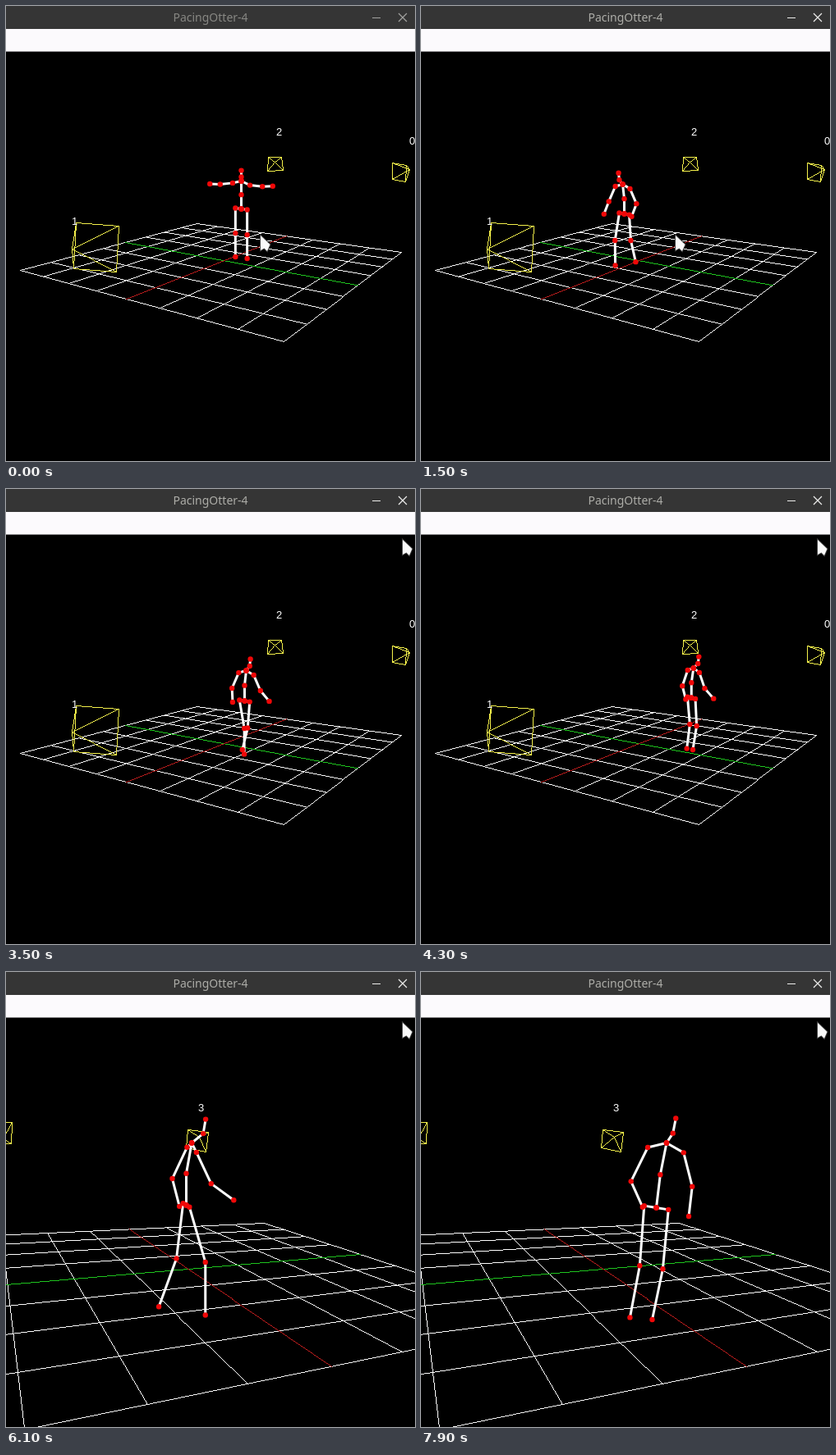
These frames come from a looping animation (498 by 555 pixels, 8000 ms). An HTML page with a canvas:

```html
<!DOCTYPE html>
<html lang="en">
<head>
<meta charset="utf-8">
<title>PacingOtter-4</title>
<style>
html, body { margin: 0; width: 100%; height: 100%; overflow: hidden; background: #000; }
canvas { display: block; }
</style>
</head>
<body>
<canvas id="stage" width="498" height="555"></canvas>
<script>
const W = 498, H = 555, LOOP = 8000, STEP = 100;
const CUT = 4800, FOCUS = 1300;
const ctx = document.getElementById('stage').getContext('2d');
const sin = deg => Math.sin(deg * Math.PI / 180);
const cos = deg => Math.cos(deg * Math.PI / 180);
const clamp = n => Math.min(1, Math.max(0, n));

// ---------- scenery ----------

// Maps the unit square onto a quad in perspective.
function perspective([ax, ay], [bx, by], [cx, cy], [dx, dy]) {
  const x1 = bx - cx, y1 = by - cy, x2 = dx - cx, y2 = dy - cy;
  const sx = ax - bx + cx - dx, sy = ay - by + cy - dy;
  const den = x1 * y2 - x2 * y1;
  const g = (sx * y2 - x2 * sy) / den, h = (x1 * sy - sx * y1) / den;
  return (u, v) => {
    const w = 1 + g * u + h * v;
    return [
      (ax + (bx - ax + g * bx) * u + (dx - ax + h * dx) * v) / w,
      (ay + (by - ay + g * by) * u + (dy - ay + h * dy) * v) / w
    ];
  };
}

// Hard-edged one pixel line.
function thinLine(c, [x0, y0], [x1, y1]) {
  const n = Math.max(1, Math.ceil(Math.max(Math.abs(x1 - x0), Math.abs(y1 - y0))));
  for (let i = 0; i <= n; i++) {
    c.fillRect(Math.round(x0 + (x1 - x0) * i / n), Math.round(y0 + (y1 - y0) * i / n), 1, 1);
  }
}

function drawGrid(c, at) {
  const row = k => thinLine(c, at(0, k), at(8, k));
  const col = k => thinLine(c, at(k, 0), at(k, 8));
  c.fillStyle = '#fff';
  for (let k = 0; k <= 8; k++) {
    if (k === 4) continue;
    row(k);
    col(k);
  }
  c.fillStyle = '#1ec41e';
  row(4);
  c.fillStyle = '#b81c1c';
  col(4);
}

function drawCamera(c, corners, apex, label, x, y) {
  c.fillStyle = '#f4f04a';
  corners.forEach((p, i) => {
    thinLine(c, p, corners[(i + 1) % 4]);
    thinLine(c, p, apex);
  });
  if (!label) return;
  c.fillStyle = '#fff';
  c.font = '13px "Liberation Sans", Arial, sans-serif';
  c.fillText(label, x, y);
}

function makeScene(at, cameras) {
  const layer = document.createElement('canvas');
  layer.width = W;
  layer.height = H;
  const c = layer.getContext('2d');
  c.fillStyle = '#000';
  c.fillRect(0, 0, W, H);
  drawGrid(c, at);
  cameras.forEach(cam => drawCamera(c, ...cam));
  return layer;
}

const farMap = perspective([17, 322], [338, 409], [481, 300], [232, 265]);
const nearMap = perspective([50, 318], [195, 311.4], [482, 463], [172, 527]);

const farScene = makeScene((i, j) => farMap(i / 8, j / 8), [
  [[[85, 264], [137, 268], [134, 324], [82, 320]], [80, 296], '1', 80, 267],
  [[[319, 184], [335, 184], [337, 200], [318, 201]], [327, 190], '2', 329, 158],
  [[[470, 191], [487, 194], [486, 214], [470, 211]], [491, 199], '0', 491, 169]
]);
const nearScene = makeScene((i, j) => nearMap((i - 2) / 3, j / 8), [
  [[[-19, 182], [7, 183], [6, 209], [-20, 207]], [-4, 203]],
  [[[221, 192], [246, 195], [243, 219], [219, 214]], [235, 201], '3', 234, 170]
]);

// ---------- motion ----------

// time, pelvis x, pelvis y, torso length, turn, lean, upper arm spread, forearm spread
const farWalk = [
  [0, 286, 247, 34, 0, 0, 85, 92],
  [850, 277, 252, 35, -20, 0, 24, 0],
  [1500, 247, 253, 36, -37, 0, 24, 0],
  [2000, 231, 258, 36, 0, 0, 16, 0],
  [2800, 247, 257, 35, 84, 0, 6, 3],
  [3500, 290, 258, 37, 37, 0, 24, 19],
  [4800, 353, 252, 36, 60, 0, 16, 10]
];
const nearWalk = [
  [4800, 146, 270, 68, 8, 0, 6, -17],
  [5000, 157, 272, 69, 12, 0, 6, -17],
  [6100, 219, 284, 76, 76, 0, 26, 20],
  [7200, 299, 287, 81, 70, 0, 26, 20],
  [7900, 286, 287, 79, 25, .12, 21, -15]
];
const cursorPath = [[0, 310, 280], [2100, 310, 280], [2700, 453, 39], [2800, 453, 39], [3400, 483, 62]];

function sample(keys, t) {
  const i = keys.findIndex(k => k[0] > t);
  if (i < 0) return keys[keys.length - 1].slice(1);
  const a = keys[i - 1], b = keys[i];
  const k = (t - a[0]) / (b[0] - a[0]);
  return a.map((n, j) => n + (b[j] - n) * k).slice(1);
}

// Builds the bone chains of a walking body, in units of the torso length.
function body(t, [x, y, size, turn, lean, arm, fore]) {
  const place = ([px, up]) => [x + size * (px + lean * up), y - size * up];
  const ahead = sin(turn), across = cos(turn);
  const gait = clamp((t - 500) / 800);
  const phase = 90 + (t - 3500) / 1040 * 360;
  const pelvis = [0, 0], chest = [.09 * ahead, 1];

  const armChain = side => {
    const reach = 1 - .2 * sin(arm) ** 2;
    const bend = 36 * ahead + side * fore;
    const shoulder = [chest[0] + side * .31 * across, .89 - side * .04];
    const elbow = [shoulder[0] + side * .56 * reach * sin(arm), shoulder[1] - .56 * cos(arm)];
    const wrist = [elbow[0] + .46 * reach * sin(bend), elbow[1] - .46 * cos(bend)];
    return [chest, shoulder, elbow, wrist];
  };

  const legChain = side => {
    const swing = -side * sin(phase);
    const hip = [side * .21 * across, -side * .03];
    const bone = ([px, up], length, angle) => {
      const step = length * sin(angle * gait);
      return [px + step * ahead, up - length * cos(angle * gait) - .35 * step * across];
    };
    const knee = bone(hip, .9, 5 + 12 * swing);
    return [pelvis, hip, knee, bone(knee, .85, -10 + 10 * swing)];
  };

  const spine = [[.32 * ahead, 1.38], [.28 * ahead, 1.15], chest, [0, .51], pelvis];
  return [spine, armChain(-1), armChain(1), legChain(-1), legChain(1)].map(c => c.map(place));
}

function drawFigure(chains) {
  ctx.strokeStyle = '#fff';
  ctx.lineWidth = 3;
  ctx.lineJoin = 'round';
  ctx.beginPath();
  for (const chain of chains) {
    chain.forEach(([x, y], i) => ctx[i ? 'lineTo' : 'moveTo'](x + .5, y + .5));
  }
  ctx.stroke();
  ctx.fillStyle = '#f00808';
  for (const [x, y] of chains.flat()) {
    ctx.beginPath();
    ctx.arc(x + .5, y + .5, 3.2, 0, Math.PI * 2);
    ctx.fill();
  }
}

// ---------- window ----------

function drawWindow(active) {
  ctx.fillStyle = '#353535';
  ctx.fillRect(0, 0, W, 28);
  ctx.fillStyle = '#fcfafd';
  ctx.fillRect(0, 28, W, 27);
  ctx.fillStyle = '#8f8d90';
  ctx.fillRect(0, 55, W, 1);
  ctx.fillStyle = active ? '#adada8' : '#878783';
  ctx.font = '14px "Noto Sans", "Open Sans", sans-serif';
  ctx.textAlign = 'center';
  ctx.fillText('PacingOtter-4', 249, 19);
  ctx.strokeStyle = active ? '#eeeeec' : '#a2a2a0';
  ctx.lineWidth = 1.2;
  ctx.beginPath();
  ctx.moveTo(446, 14.5);
  ctx.lineTo(456, 14.5);
  ctx.moveTo(478, 9);
  ctx.lineTo(488, 19);
  ctx.moveTo(488, 9);
  ctx.lineTo(478, 19);
  ctx.stroke();
}

function drawCursor([x, y]) {
  ctx.beginPath();
  for (const [dx, dy] of [[0, 0], [11.5, 11], [8, 19], [4.5, 15.5], [0, 18]]) ctx.lineTo(x + dx, y + dy);
  ctx.closePath();
  ctx.lineJoin = 'miter';
  ctx.lineWidth = 2;
  ctx.strokeStyle = '#3c3c3c';
  ctx.stroke();
  ctx.fillStyle = '#fafafa';
  ctx.fill();
}

function draw(now) {
  const t = Math.floor(now % LOOP / STEP) * STEP;
  const far = t < CUT;
  ctx.drawImage(far ? farScene : nearScene, 0, 0);
  drawFigure(body(t, sample(far ? farWalk : nearWalk, t)));
  drawWindow(t >= FOCUS);
  drawCursor(sample(cursorPath, t));
}

let start;
function tick(now) {
  if (start === undefined) start = now;
  draw(now - start);
  requestAnimationFrame(tick);
}
draw(0);
requestAnimationFrame(tick);
</script>
</body>
</html>
```
